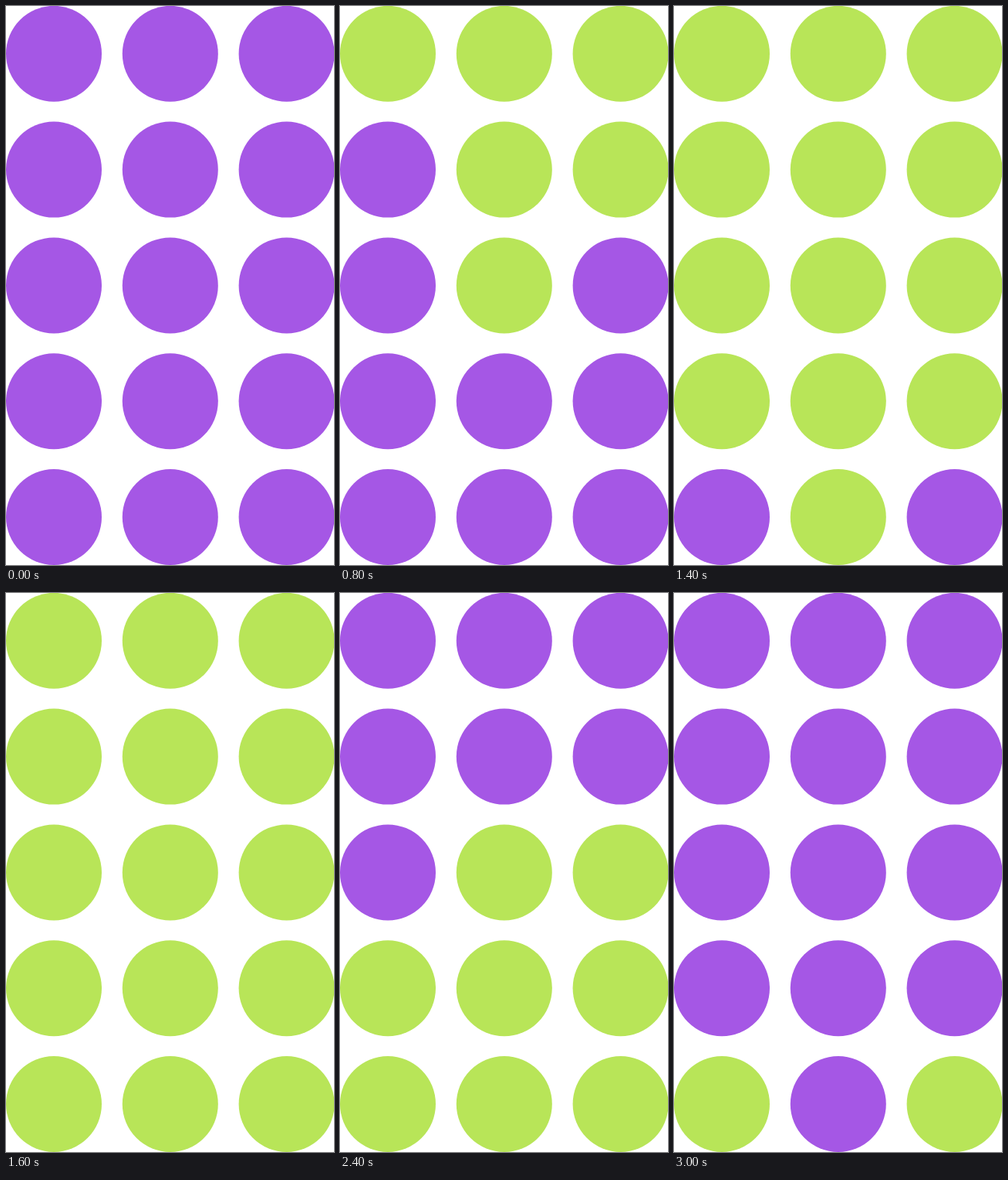
An HTML page for the animation above (3.2 s loop, 425 by 723 pixels).

```html
<!DOCTYPE html>
<html lang="en">
<head>
<meta charset="utf-8">
<title>Dots</title>
<style>
  html, body { margin: 0; width: 100%; height: 100%; overflow: hidden; background: #fff; }
  svg { display: block; width: 425px; height: 723px; }
</style>
</head>
<body>
<svg viewBox="0 0 425 723"></svg>
<script>
const PURPLE = '#a557e5', GREEN = '#b8e558';
const STEP = 200, STEPS = 16;

// Dots are numbered row by row; each group flips together, one group per step.
const toGreen = [[2], [1], [0, 4], [5, 7], [3, 6], [8, 11], [9, 10, 13], [12, 14]];
const toPurple = [[0], [1, 3], [2, 5], [4, 6], [7, 9], [8, 10], [11, 13], [12, 14]];

const svg = document.querySelector('svg');
const dots = Array.from({ length: 15 }, (_, i) => {
  const dot = document.createElementNS(svg.namespaceURI, 'circle');
  dot.setAttribute('cx', 62 + (i % 3) * 150.8);
  dot.setAttribute('cy', 61.8 + Math.floor(i / 3) * 149.8);
  dot.setAttribute('r', 62);
  svg.append(dot);
  return dot;
});

const stepOf = (groups, i, first) => first + groups.findIndex(g => g.includes(i));
const spans = dots.map((_, i) => [stepOf(toGreen, i, 1), stepOf(toPurple, i, 9)]);

const start = performance.now();
function draw() {
  const step = Math.floor((performance.now() - start) / STEP) % STEPS;
  dots.forEach((dot, i) => {
    const [on, off] = spans[i];
    dot.setAttribute('fill', step >= on && step < off ? GREEN : PURPLE);
  });
  requestAnimationFrame(draw);
}
draw();
</script>
</body>
</html>
```
